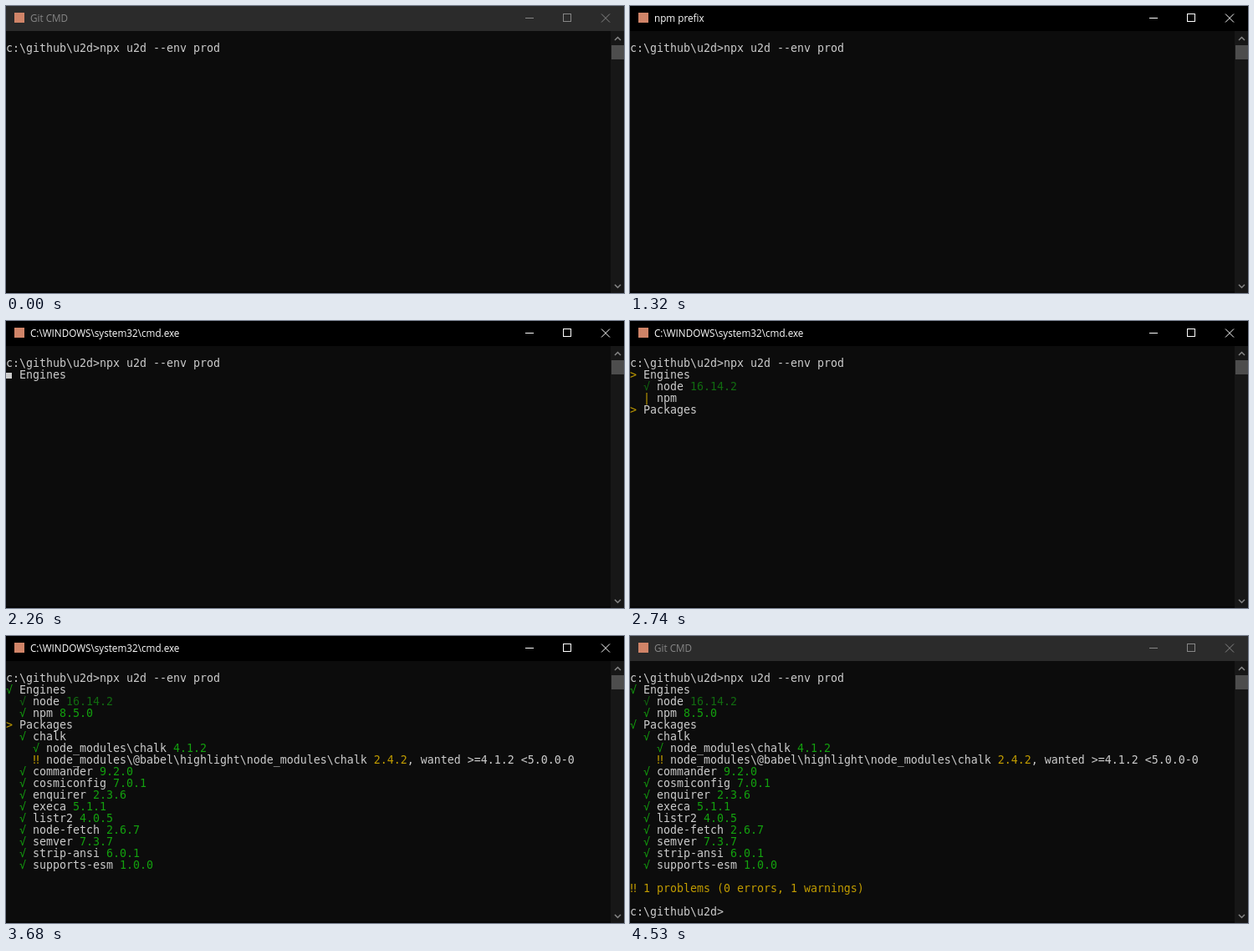
These frames come from a looping animation (739 px wide and 344 px high, 6.53 s). An HTML page:

```html
<!DOCTYPE html>
<html lang="en">
<head>
<meta charset="utf-8">
<title>Terminal</title>
<style>
  html, body { margin: 0; width: 100%; height: 100%; overflow: hidden; background: #0c0c0c; }
  #stage { position: relative; width: 739px; height: 344px; overflow: hidden; background: #0c0c0c; }
  #stage > * { position: absolute; }
  #bar { left: 0; top: 0; width: 739px; height: 30px; background: #2b2b2b; color: #868686; }
  .active #bar { background: #000; color: #fff; }
  .icon { position: absolute; left: 10px; top: 8px; width: 12px; height: 12px; background: #d08468; }
  .title {
    position: absolute; left: 29px; top: 0; white-space: pre;
    font: 11.7px/29px "Open Sans", "Noto Sans", sans-serif;
  }
  svg { left: 0; top: 0; }
  .buttons { fill: none; stroke: #868686; }
  .active .buttons { stroke: #fff; }
  .row {
    left: 0; height: 14px; white-space: pre; color: #ccc;
    font: 13.29px/14px "DejaVu Sans Mono", "Liberation Mono", monospace;
  }
  .row b { font-weight: normal; }
  .g { color: #13a10e; }
  .d { color: #116b10; }
  .y { color: #c19c00; }
  .sq { display: inline-block; width: 7px; height: 7px; margin-right: 1px; background: #ccc; }
  .caret { width: 8px; height: 4px; background: #f2f2f2; }
  .edge { left: 0; top: 342px; width: 723px; height: 2px; background: #060606; }
</style>
</head>
<body>
<div id="stage">
  <div id="bar"><div class="icon"></div></div>
  <div class="edge"></div>
  <svg width="739" height="344">
    <g class="buttons">
      <path d="M621 14.5h10M666.5 9.5h9v9h-9z" shape-rendering="crispEdges"/>
      <path d="M712 9.5l10 10M722 9.5l-10 10"/>
    </g>
    <path d="M723 30h16v314h-16z" fill="#171717"/>
    <path d="M724 47h15v17h-15z" fill="#4d4d4d"/>
    <path d="M728 41l3.5-3.5 3.5 3.5M728 334l3.5 3.5 3.5-3.5" fill="none" stroke="#858585" stroke-width="1.5"/>
    <circle id="halo" cx="697" cy="339" r="12" fill="#827d08"/>
    <path id="tip" d="M698 341v3h3z" fill="#fff"/>
    <path id="tipStart" d="M698 342v2h2z" fill="#fff"/>
  </svg>
</div>
<script>
const LOOP = 6530;
const stage = document.getElementById('stage');
const bar = document.getElementById('bar');
const timed = [];

// Shows an element between two moments of the loop.
function during(el, from, to = LOOP) {
  timed.push({ el, from, to });
}

function add(parent, cls, html, from, to) {
  const el = document.createElement('div');
  el.className = cls;
  el.innerHTML = html;
  parent.appendChild(el);
  during(el, from, to);
  return el;
}

function row(n, html, from, to) {
  add(stage, 'row', html, from, to).style.top = 30 + 14 * n + 'px';
}

function caret(col, n, from, to) {
  const el = add(stage, 'caret', '', from, to);
  el.style.left = col * 8 + 'px';
  el.style.top = 40 + 14 * n + 'px';
}

const paint = (cls, text) => `<b class="${cls}">${text}</b>`;
const passed = (depth, name, version = '', cls = 'g') =>
  '  '.repeat(depth) + paint(cls, '√') + ' ' + name + ' ' + paint(cls, version);

// Window titles: text and the time each one starts.
const titles = [
  ['Git CMD', 0], ['npm', 860], ['npm prefix', 1320], ['npm', 1460],
  ['npm exec u2d --env prod', 1600], ['C:\\WINDOWS\\system32\\cmd.exe', 1920],
  ['Git CMD', 3800]
];
titles.forEach(([text, from], i) =>
  add(bar, 'title', text, from, i + 1 < titles.length ? titles[i + 1][1] : LOOP));

const prompt = 'c:\\github\\u2d&gt;';
row(1, prompt + 'npx u2d --env prod', 0);

// Engines
row(2, '<i class="sq"></i> Engines', 2260, 2340);
row(2, paint('y', '&gt;') + ' Engines', 2340, 3340);
row(2, passed(0, 'Engines'), 3340);
row(3, '  ' + paint('y', '-') + ' node', 2340, 2400);
row(3, passed(1, 'node', '16.14.2', 'd'), 2400);

const ticks = [2340, 2540, 2640, 2760, 2860, 3000, 3060, 3200, 3260];
ticks.slice(0, -1).forEach((from, i) =>
  row(4, '  ' + paint('y', '-\\|/'[i % 4]) + ' npm', from, ticks[i + 1]));
row(4, passed(1, 'npm', '8.5.0'), 3260);

// Packages
row(5, paint('y', '&gt;') + ' Packages', 2340, 3740);
row(5, passed(0, 'Packages'), 3740);
row(6, passed(1, 'chalk'), 3680);
row(7, passed(2, 'node_modules\\chalk', '4.1.2'), 3680);
row(8, '    ' + paint('y', '‼') + ' node_modules\\@babel\\highlight\\node_modules\\chalk ' +
  paint('y', '2.4.2') + ', wanted &gt;=4.1.2 &lt;5.0.0-0', 3680);
[
  ['commander', '9.2.0'], ['cosmiconfig', '7.0.1'], ['enquirer', '2.3.6'],
  ['execa', '5.1.1'], ['listr2', '4.0.5'], ['node-fetch', '2.6.7'],
  ['semver', '7.3.7'], ['strip-ansi', '6.0.1'], ['supports-esm', '1.0.0']
].forEach(([name, version], i) => row(9 + i, passed(1, name, version), 3680));
row(19, paint('y', '‼ 1 problems (0 errors, 1 warnings)'), 3740);
row(21, prompt, 3800);

caret(32, 1, 660, 860);
caret(0, 2, 860, 1120);
caret(0, 2, 1720, 2140);
caret(14, 21, 3800, 4530);

during(document.getElementById('tipStart'), 400, 460);
during(document.getElementById('tip'), 460, 920);
during(document.getElementById('halo'), 600, 660);

const start = performance.now();
function draw() {
  const t = (performance.now() - start) % LOOP;
  stage.classList.toggle('active', t >= 600 && t < 4530);
  for (const { el, from, to } of timed)
    el.style.visibility = t >= from && t < to ? 'visible' : 'hidden';
  requestAnimationFrame(draw);
}
draw();
</script>
</body>
</html>
```
